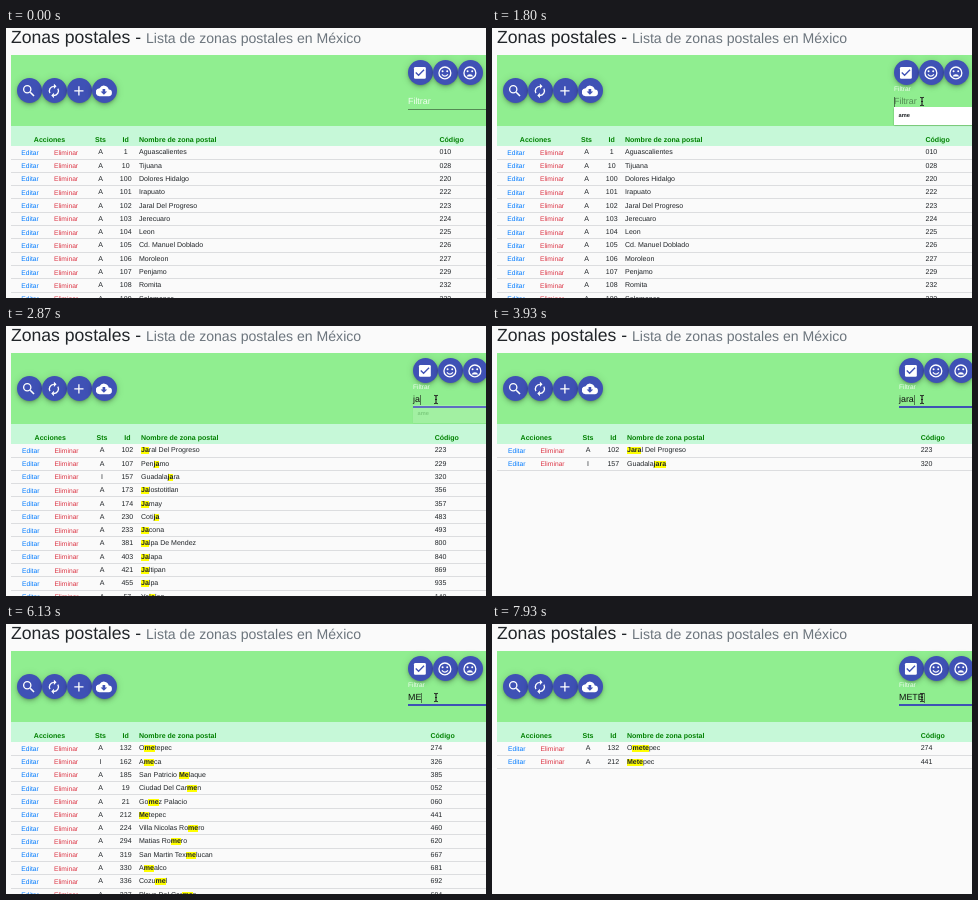
Animation of 480 by 270 pixels, one loop 8000 ms. Source, as an HTML page:

```html
<!DOCTYPE html>
<html lang="es">
<head>
<meta charset="utf-8">
<title>Zonas postales</title>
<style>
  html, body { margin: 0; width: 100%; height: 100%; overflow: hidden; background: #fafafa; }
  #stage {
    position: relative; width: 480px; height: 270px; overflow: hidden;
    font: 7.04px/13.3px "Liberation Sans", Arial, sans-serif; color: #212529;
    text-rendering: geometricPrecision; white-space: pre;
  }
  #stage div, #stage span { position: absolute; }
  #table, #tools { left: 0; top: 0; width: 480px; height: 270px; }
  #title { left: 5px; top: -1px; font-size: 17.6px; line-height: 20px; }
  #title small { font-size: 80%; color: #6c757d; }
  #panel { left: 5px; top: 27px; width: 475px; height: 71px; background: #90ee90; }
  #head { left: 5px; top: 98px; width: 475px; height: 20.3px; background: #c6f8d8; }
  .row { left: 5px; width: 475px; height: 13.3px; box-sizing: border-box; border-bottom: 1px solid #dcdddf; }
  .mid { transform: translateX(-50%); }
  .th { font-weight: bold; color: #008000; }
  .edit { color: #007bff; font-size: 6.7px; margin-top: .5px; }
  .del { color: #dc3545; font-size: 6.7px; margin-top: .5px; }
  mark { background: #ff0; color: inherit; font-weight: bold; }
  .fab {
    width: 25px; height: 25px; border-radius: 50%; background: #3f51b5;
    box-shadow: 0 1.3px 2.2px -.4px #0003, 0 2.6px 4.4px #0002, 0 .5px 8px #0002;
  }
  .fab svg { position: absolute; left: 4.6px; top: 4.6px; width: 15.8px; height: 15.8px; }
  #field { top: 0; width: 90px; height: 110px; }
  #label { left: 0; top: 67px; font-size: 8.9px; color: #fff; opacity: .85; transform-origin: 0 50%; }
  #hint { left: 0; top: 67px; font-size: 8.9px; color: #0000006b; }
  #value { left: 0; top: 67px; font-size: 8.9px; color: #111; }
  #caret { top: 68.5px; width: 1px; height: 10px; background: #1118; }
  #line { left: 0; top: 81px; width: 90px; height: 1px; background: #0000006b; }
  #focus { left: 0; top: 80px; width: 90px; height: 2px; background: #3f51b5; }
  #popup { left: 0; top: 79px; width: 90px; height: 18px; background: #fff; box-shadow: 0 .5px 1.5px #0006; }
  #popup span { left: 4.5px; top: 3px; font-size: 5.7px; font-weight: bold; }
  #mouse { left: 0; top: 0; width: 6px; height: 10px; }
  #mouse svg { position: absolute; left: 0; top: 0; }
</style>
</head>
<body>
<div id="stage">
  <span id="title">Zonas postales - <small>Lista de zonas postales en México</small></span>
  <div id="panel"></div>
  <div id="head"></div>
  <div id="table"></div>
  <div id="tools"></div>
  <div id="field">
    <div id="line"></div><div id="focus"></div>
    <span id="label">Filtrar</span><span id="hint">Filtrar</span>
    <span id="value"></span><div id="caret"></div>
    <div id="popup"><span>ame</span></div>
  </div>
  <div id="mouse"><svg width="6" height="10" fill="none" stroke="#222" stroke-width="1.1"><path d="M1 .8Q3 .8 3 2V8Q3 9.2 1 9.2M5 .8Q3 .8 3 2M3 8Q3 9.2 5 9.2M2 5H4"/></svg></div>
</div>
<script>
const LOOP = 8000, CLICK = 1300, POPUP = 1700, ROW = 13.3, TOP = 118.3;

// [time, text in the filter]
const typing = [
  [0, ''], [2670, 'j'], [2780, 'ja'], [3330, 'jar'], [3530, 'jara'],
  [4730, 'jar'], [4880, 'ja'], [5130, 'j'], [5270, ''], [5400, 'M'],
  [5630, 'ME'], [7470, 'MET'], [7870, 'METE']
];

const zones = `1|Aguascalientes|010
10|Tijuana|028
100|Dolores Hidalgo|220
101|Irapuato|222
102|Jaral Del Progreso|223
103|Jerecuaro|224
104|Leon|225
105|Cd. Manuel Doblado|226
106|Moroleon|227
107|Penjamo|229
108|Romita|232
109|Salamanca|233
132|Ometepec|274
157|Guadalajara|320|I
162|Ameca|326|I
173|Jalostotitlan|356
174|Jamay|357
185|San Patricio Melaque|385
19|Ciudad Del Carmen|052
21|Gomez Palacio|060
212|Metepec|441
224|Villa Nicolas Romero|460
230|Cotija|483
233|Jacona|493
294|Matias Romero|620
319|San Martin Texmelucan|667
330|Amealco|681
336|Cozumel|692
337|Playa Del Carmen|694
381|Jalpa De Mendez|800
403|Jalapa|840
421|Jaltipan|869
455|Jalpa|935
57|Yajalon|140`.split('\n').map(line => line.split('|'));

const icons = {
  search: '<circle cx="9.5" cy="9.5" r="5.5"/><path d="M14 14l5.8 5.8" stroke-width="2.4"/>',
  renew: '<path d="M6 15.5A7 7 0 0 1 12 5M18 8.5A7 7 0 0 1 12 19"/><path d="M12 1l4 4-4 4zM12 23l-4-4 4-4z" fill="#fff" stroke="none"/>',
  add: '<path d="M12 5V19M5 12H19"/>',
  cloud: '<path fill="#fff" stroke="none" d="M19.4 10A7.5 7.5 0 0 0 5.4 8A6 6 0 0 0 6 20H19A5 5 0 0 0 19.4 10zM17 13l-5 5-5-5h3V9h4v4z"/>',
  check: '<rect x="3" y="3" width="18" height="18" rx="2" fill="#fff" stroke="none"/><path d="M5.7 11.3L10 15.6 18.3 7.3" stroke="#3f51b5"/>',
  happy: face('<path d="M7.5 14.2Q12 19.5 16.5 14.2"/>'),
  sad: face('<path d="M6.9 17.5A5.5 5.5 0 0 1 17.1 17.5z" fill="#fff" stroke="none"/>')
};

function face(mouth) {
  return `<circle cx="12" cy="12" r="9"/>${mouth}
    <path d="M8.5 9.5h.01M15.5 9.5h.01" stroke-width="3" stroke-linecap="round"/>`;
}

const $ = id => document.getElementById(id);
const clamp = v => Math.max(0, Math.min(1, v));
const ease = v => v * v * (3 - 2 * v);
const cell = (x, y, text, cls = '') =>
  `<span class="${cls}" style="left:${x}px;top:${y}px">${text}</span>`;
const fab = (x, y, name) =>
  `<div class="fab" style="left:${x - 12.5}px;top:${y - 12.5}px"><svg viewBox="0 0 24 24" fill="none" stroke="#fff" stroke-width="2">${icons[name]}</svg></div>`;

// Column positions follow the width of the listed content.
function layoutFor(query) {
  if (/^(j|MET)/.test(query)) return { shift: 1, name: 135, code: 428.7, field: 407 };
  return { shift: 0, name: 133, code: query ? 424.5 : 433.5, field: 402 };
}

function mark(name, query) {
  const at = name.toLowerCase().indexOf(query.toLowerCase()), end = at + query.length;
  return query ? `${name.slice(0, at)}<mark>${name.slice(at, end)}</mark>${name.slice(end)}` : name;
}

function render(query) {
  const { shift, name, code, field } = layoutFor(query);
  const sts = 94.5 + shift * 1.5, id = 119.7 + shift * 1.6;
  let html = cell(43.5 + shift * .7, 106.4, 'Acciones', 'th mid') + cell(sts, 106.4, 'Sts', 'th mid') +
    cell(id, 106.4, 'Id', 'th mid') + cell(name, 106.4, 'Nombre de zona postal', 'th') +
    cell(code, 106.4, 'Código', 'th');
  zones.filter(z => z[1].toLowerCase().includes(query.toLowerCase())).slice(0, 12).forEach((z, i) => {
    const y = TOP + i * ROW;
    html += `<div class="row" style="top:${y}px"></div>` +
      cell(24 + shift * .7, y, 'Editar', 'edit mid') + cell(60 + shift * .5, y, 'Eliminar', 'del mid') +
      cell(sts, y, z[3] || 'A', 'mid') + cell(id, y, z[0], 'mid') +
      cell(name, y, mark(z[1], query)) + cell(code, y, z[2]);
  });
  $('table').innerHTML = html;
  $('tools').innerHTML =
    ['search', 'renew', 'add', 'cloud'].map((n, i) => fab(23 + i * 25, 62.5, n)).join('') +
    ['check', 'happy', 'sad'].map((n, i) => fab(field + 12.2 + i * 25, 44.5, n)).join('');
  $('field').style.left = field + 'px';
  $('value').textContent = query;
  $('caret').style.left = $('value').getBoundingClientRect().width + 'px';
}

let shown = null;

function draw(t) {
  const [since, query] = typing.findLast(step => step[0] <= t);
  if (query !== shown) render(shown = query);

  const focus = ease(clamp((t - CLICK) / 400));
  $('label').style.transform = `translateY(${-12.3 * focus}px) scale(${1 - .26 * focus})`;
  $('hint').style.opacity = query ? 0 : focus;
  $('focus').style.transform = `scaleX(${focus})`;

  const blink = Math.floor((t - Math.max(since, CLICK)) / 560) % 2 === 0;
  $('caret').style.opacity = t >= CLICK && blink ? 1 : 0;
  $('popup').style.opacity = t < POPUP ? 0 : 1 - clamp((t - 2670) / 240);

  const move = ease(clamp((t - 700) / 500));
  $('mouse').style.transform = `translate(${427 + 56 * (1 - move)}px,${68.5 + 40 * (1 - move)}px)`;
}

const start = performance.now();
function tick() {
  draw((performance.now() - start) % LOOP);
  requestAnimationFrame(tick);
}
tick();
</script>
</body>
</html>
```
